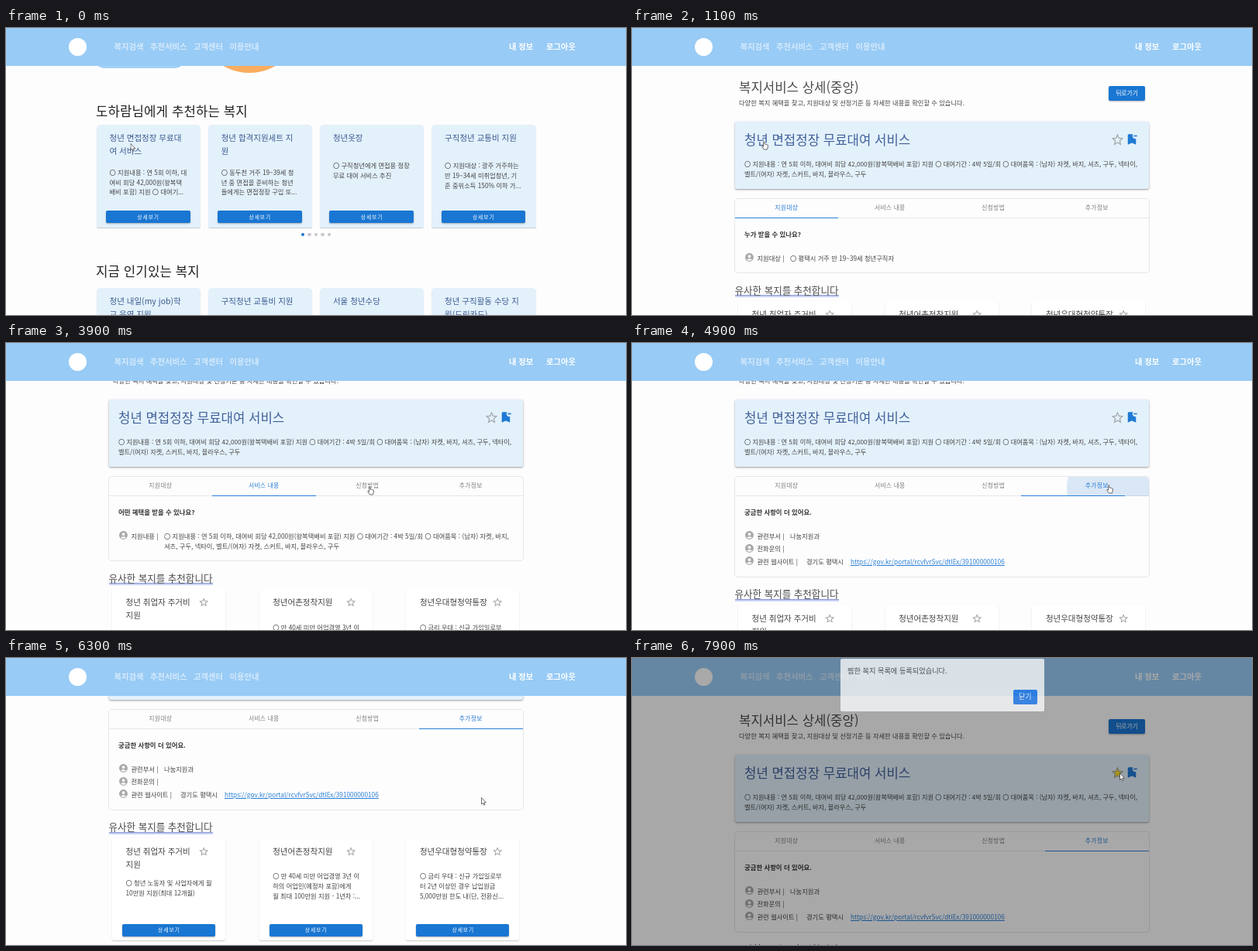
Write an HTML page that moves like this. It is 800x371 px and loops after 8000 ms.

```html
<!DOCTYPE html>
<html lang="ko">
<head>
<meta charset="utf-8">
<title>복지서비스 상세</title>
<style>
html, body { margin: 0; width: 100%; height: 100%; overflow: hidden; background: #fefdfe; }
body { position: relative; color: #444; font-weight: 350; font-family: "Noto Sans CJK KR", "Noto Sans KR", "Noto Sans CJK", "Noto Sans CJK JP", sans-serif; }
div, svg { position: absolute; box-sizing: border-box; }
.layer { left: 0; top: 0; width: 800px; height: 371px; }
.t { white-space: nowrap; }
.mid { transform: translateX(-50%); }
.nav { color: #d6eafc; font-weight: 700; }
.user { color: #fff; font-weight: 700; }
.h { color: #222; font-weight: 400; letter-spacing: .00735em; }
.title { color: #3a5a90; }
.dark { color: #444; }
.thin { color: #4c4c4e; font-weight: 300; letter-spacing: 0; }
.title.thin { color: #40609a; }
.q { color: #333; font-weight: 700; }
.btn { background: #1976d2; border-radius: 2px; box-shadow: 0 1px 2px rgba(0,0,0,.3); }
.btnText { color: #fff; font-weight: 500; }
.wide { letter-spacing: .13em; }
.blue { background: #e3f1fb; border-radius: 5px 5px 2px 2px; box-shadow: 0 1px 1px rgba(0,0,0,.2); }
.white { background: #fff; border-radius: 2px; box-shadow: 0 1px 1.5px rgba(0,0,0,.2); }
.tab { color: #808080; letter-spacing: .02857em; }
.tab.on { color: #2a7fd5; }
.link { color: #2a80d6; text-decoration: underline; }
</style>
</head>
<body>
<div id="home" class="layer"></div>
<div id="detail" class="layer"></div>
<div id="header" class="layer" style="height:49px;background:#98cbf5"></div>
<div id="shade" class="layer" style="background:#000"></div>
<div id="dialog" class="layer"></div>
<div id="cursor" style="left:0;top:0">
  <svg id="arrow" width="9" height="13" viewBox="0 0 9 13"><path d="M.5 .5V9L2.4 7.3 3.7 10.2 5 9.6 3.8 6.8H6.4Z" fill="#fff" stroke="#333" stroke-width=".7"/></svg>
  <svg id="hand" width="12" height="13" viewBox="0 0 12 13" style="left:-3px"><path d="M2.6 1.2Q3.3 .2 4 1.2V4.2Q4.9 3.6 5.5 4.5 6.4 4 7 4.9 8.2 4.5 8.4 5.8V8L7.4 11H3.4L.8 7.4Q.6 6.2 1.6 6.5L2.6 7.4Z" fill="#fff" stroke="#333" stroke-width=".7"/></svg>
</div>
<script>
const LOOP = 8000, STEP = 100;
const $ = id => document.getElementById(id);

// Text whose first line is centred on cy
const text = (x, cy, size, str, cls = '', lh = 16) =>
  `<div class="t ${cls}" style="left:${x}px;top:${cy - lh / 2 - .04 * size}px;font-size:${size}px;line-height:${lh}px">${str}</div>`;
const box = (x, y, w, h, cls = '', css = '', inner = '') =>
  `<div class="${cls}" style="left:${x}px;top:${y}px;width:${w}px;height:${h}px;${css}">${inner}</div>`;
const icon = (cx, cy, size, d, color, id = '') =>
  `<svg ${id && `id="${id}"`} style="left:${cx - size / 2}px;top:${cy - size / 2}px" width="${size}" height="${size}" viewBox="0 0 24 24"><path d="${d}" fill="${color}"/></svg>`;
const body = (x, cy, str, cls) => text(x, cy, 8.27, str, cls, 12.7);
const title = (x, cy, str, cls = 'title') => text(x, cy, 10.5, str, cls, 16.7);
const more = (x, y, w) => box(x, y, w, 16, 'btn') + text(x + w / 2 + .4, y + 8, 6.8, '상세보기', 'btnText wide mid');

const STAR = 'M22 9.24l-7.19-.62L12 2 9.19 8.63 2 9.24l5.46 4.73L5.82 21 12 17.27 18.18 21l-1.63-7.03L22 9.24z';
const STAR_HOLE = 'M12 15.4l-3.76 2.27 1-4.28-3.32-2.88 4.38-.38L12 6.1l1.71 4.04 4.38.38-3.32 2.88 1 4.28L12 15.4z';
const MARK = 'M21 7h-6V5h6zM19 21l-7-3-7 3V5c0-1.1.9-2 2-2h7c-.63.84-1 1.87-1 3 0 2.76 2.24 5 5 5 .34 0 .68-.03 1-.1z';
const PERSON = 'M12 2C6.48 2 2 6.48 2 12s4.48 10 10 10 10-4.48 10-10S17.52 2 12 2zm0 4c1.93 0 3.5 1.57 3.5 3.5S13.93 13 12 13s-3.5-1.57-3.5-3.5S10.07 6 12 6zm0 14c-2.03 0-4.43-.82-6.14-2.88C7.55 15.8 9.68 15 12 15s4.45.8 6.14 2.12C16.43 19.18 14.03 20 12 20z';

// Header
$('header').innerHTML = box(81, 13, 23, 23, '', 'background:#fff;border-radius:50%') +
  [[139.5, '복지검색'], [186, '추천서비스'], [242, '고객센터'], [288.5, '이용안내']]
    .map(([x, s]) => text(x, 24.5, 10.3, s, 'nav')).join('') +
  text(649, 24.5, 10.3, '내 정보', 'user') + text(697, 24.5, 10.3, '로그아웃', 'user');

// Home page
const picks = [
  ['청년 면접정장 무료대<br>여 서비스', '〇 지원내용 : 연 5회 이하, 대<br>여비 회당 42,000원(왕복택<br>배비 포함) 지원 〇 대여기...'],
  ['청년 합격지원세트 지<br>원', '〇 동두천 거주 19~39세 청<br>년 중 면접을 준비하는 청년<br>들에게는 면접정장 구입 또...'],
  ['청년옷장', '〇 구직청년에게 면접용 정장<br>무료 대여 서비스 추진'],
  ['구직청년 교통비 지원', '〇 지원대상 : 광주 거주하는<br>만 19~34세 미취업청년, 기<br>준 중위소득 150% 이하 가...']
];
const popular = ['청년 내일(my job)학<br>교 운영 지원', '구직청년 교통비 지원', '서울 청년수당', '청년 구직활동 수당 지<br>원(드림카드)'];
const homeX = i => 116.5 + 144.2 * i;
$('home').innerHTML =
  box(116, 20, 113, 32, '', 'background:#a3d1f7;border-radius:10px') +
  box(247, -76, 134, 134, '', 'background:#f9ad60;border-radius:50%') +
  text(116, 108, 16.74, '도하람님에게 추천하는 복지', 'h', 24) +
  text(116, 315, 16.74, '지금 인기있는 복지', 'h', 24) +
  picks.map(([name, info], i) => {
    const x = homeX(i);
    return box(x, 125, 134.5, 133, 'blue') + title(x + 17, 143, name) +
      body(x + 17, name.includes('<br>') ? 186.5 : 178, info) + more(x + 12.5, 236, 108.5);
  }).join('') +
  popular.map((name, i) => box(homeX(i), 336, 134.5, 133, 'blue') + title(homeX(i) + 17, 354, name)).join('') +
  [0, 1, 2, 3, 4].map(i => box(380.8 + 8.5 * i, 264.8, 4.4, 4.4, '', `border-radius:50%;background:${i ? '#c8c8cc' : '#1976d2'}`)).join('');

// Detail page
const TAB_X = 132.5, TAB_W = 133.5, FRAME_Y = 224;
const row = (cy, label, rest = '') => icon(151, cy - .8, 13, PERSON, '#a9a9ab') + body(161.5, cy, label + ' |') + rest;
const panels = [
  ['누가 받을 수 있나요?', 320.5, row(301.5, '지원대상', body(204, 301.5, '〇 평택시 거주 만 19~39세 청년구직자'))],
  ['어떤 혜택을 받을 수 있나요?', 333.5, row(301.5, '지원내용', body(204, 301.5,
    '〇 지원내용 : 연 5회 이하, 대여비 회당 42,000원(왕복택배비 포함) 지원 〇 대여기간 : 4박 5일/회 〇 대여품목 : (남자) 자켓, 바지,<br>셔츠, 구두, 넥타이, 벨트/(여자) 자켓, 스커트, 바지, 블라우스, 구두'))],
  ['어떻게 신청하나요?', 320.5, row(301.5, '신청방법')],
  ['궁금한 사항이 더 있어요.', 354, row(301.5, '관련부서', body(204, 301.5, '나눔지원과')) + row(318, '전화문의') +
    row(334.3, '관련 웹사이트', body(225, 334.3, '경기도 평택시') + body(282, 334.3, 'https://gov.kr/portal/rcvfvrSvc/dtlEx/391000000106', 'link'))]
];
const similar = [
  ['청년 취업자 주거비<br>지원', '〇 청년 노동자 및 사업자에게 월<br>10만원 지원(최대 12개월)'],
  ['청년어촌정착지원', '〇 만 40세 미만 어업경영 3년 이<br>하의 어업인(예정자 포함)에게<br>월 최대 100만원 지원 - 1년차 :...'],
  ['청년우대형청약통장', '〇 금리 우대 : 신규 가입일로부<br>터 2년 이상인 경우 납입원금<br>5,000만원 한도 내(단, 전환신...']
];
$('detail').innerHTML =
  text(138, 81, 16.74, '복지서비스 상세(중앙)', 'h thin', 24) +
  body(138, 101, '다양한 복지 혜택을 찾고, 지원대상 및 선정기준 등 자세한 내용을 확인할 수 있습니다.') +
  box(615, 79, 47, 18.7, 'btn') + text(638.6, 88.3, 7.85, '뒤로가기', 'btnText mid') +
  box(132.5, 125, 534.5, 86.5, '', 'background:#e3f1fb;border-radius:2px;box-shadow:0 1px 2.5px rgba(0,0,0,.4)') +
  text(145, 149, 16.74, '청년 면접정장 무료대여 서비스', 'title thin', 24) +
  icon(626, 148.5, 19, STAR, '#ffdc20', 'gold') + icon(626, 148.5, 19, STAR + STAR_HOLE, '#a6aaae') +
  icon(645.2, 148.2, 18, MARK, '#1f7ad4') +
  text(145, 180, 8.2, '〇 지원내용 : 연 5회 이하, 대여비 회당 42,000원(왕복택배비 포함) 지원 〇 대여기간 : 4박 5일/회 〇 대여품목 : (남자) 자켓, 바지, 셔츠, 구두, 넥타이,<br>벨트/(여자) 자켓, 스커트, 바지, 블라우스, 구두', '', 12.7) +
  `<div id="frame" style="left:132px;top:${FRAME_Y}px;width:535.5px;border:1px solid #e6e6ec;border-radius:5px"></div>` +
  box(132.5, 249, 534.5, 1, '', 'background:#e6e6ec') +
  box(TAB_X, 224.5, TAB_W * 4, 25, '', 'overflow:hidden;border-radius:5px 5px 0 0',
    [0, 1, 2, 3].map(i => box(TAB_W * i, 0, TAB_W, 25, '', 'overflow:hidden', '<div class="ripple" style="border-radius:50%;background:#1976d2"></div>')).join('')) +
  ['지원대상', '서비스 내용', '신청방법', '추가정보'].map((s, i) => text(TAB_X + TAB_W * (i + .5), 236.7, 7.85, s, 'tab mid')).join('') +
  `<div id="bar" style="top:248.5px;width:${TAB_W}px;height:1.5px;background:#2a80d6"></div>` +
  panels.map(([q, , rows]) => `<div class="panel" style="left:0;top:0">${text(145, 270, 8.4, q, 'q')}${rows}</div>`).join('') +
  '<div id="similar" style="left:0;top:0">' +
  box(132.5, 28.7, 134, 3.2, '', 'background:#c6d0f6;border-top:1px solid #8c9cd2') +
  text(132.5, 23, 12.55, '유사한 복지를 추천합니다', 'h thin', 18) +
  similar.map(([name, info], i) => {
    const x = 137 + 189.7 * i;
    return box(x, 37, 146, 132, 'white') + title(x + 17.5, 54.7, name, 'dark') +
      icon(x + 118, 53.7, 14.4, STAR + STAR_HOLE, '#a0a0a4') +
      body(x + 17.5, name.includes('<br>') ? 94.5 : 86, info) + more(x + 13, 147.7, 120);
  }).join('') + '</div>';

$('dialog').innerHTML =
  box(269, 1, 262.5, 67.5, '', 'background:#f7f8f9;border-radius:2px') +
  text(278, 16, 9.2, '찜한 복지 목록에 등록되었습니다.') +
  box(492, 41, 30.5, 18.5, '', 'background:#1f7cf0;border-radius:2px') + text(507.3, 50, 9, '닫기', 'btnText mid');

// Timeline
const OPEN = 800, LIKE = 7700;
const clicks = [[3150, 1], [4050, 2], [4750, 3]];
const scrolls = [[0, 4], [2430, 4], [2700, 52], [5300, 52], [5750, 158], [6450, 158], [7050, 0]];
const moves = [
  [0, 160.5, 149], [100, 160.5, 149], [500, 170, 146], [1300, 170, 146], [2100, 384.5, 198], [2700, 384.5, 198],
  [3000, 334, 182], [3400, 334, 182], [3800, 469, 185], [4150, 469, 185], [4500, 615, 183],
  [5200, 615, 183], [5400, 613, 180], [7000, 613, 180], [7450, 629, 148.5]
];
const hands = [[200, 1400], [2950, 5300]];

const clamp = v => Math.min(1, Math.max(0, v));
const smooth = v => (v = clamp(v), v * v * (3 - 2 * v));
// Eased value of column c in a table of timed rows
function at(rows, t, c = 1) {
  const i = rows.findIndex(r => r[0] > t);
  if (i < 0) return rows[rows.length - 1][c];
  const a = rows[i - 1], b = rows[i];
  return a[c] + (b[c] - a[c]) * smooth((t - a[0]) / (b[0] - a[0]));
}
const show = (el, on) => { el.style.display = on ? '' : 'none'; };

const tabs = document.querySelectorAll('.tab'), panelEls = document.querySelectorAll('.panel'), ripples = document.querySelectorAll('.ripple');

function render(t) {
  show($('home'), t < OPEN);
  show($('detail'), t >= OPEN);
  $('detail').style.top = -Math.round(at(scrolls, t)) + 'px';

  let active = 0, barPos = 0;
  for (const [time, tab] of clicks) {
    if (t >= time) active = tab;
    // the strip slows down late, so it arrives early
    barPos += Math.min(1, smooth((t - time) / 300) * 1.54);
    const age = t - time + 150, r = 84 * smooth(age / 500);
    const s = ripples[tab].style, x = at(moves, time, 1) - TAB_X - TAB_W * tab;
    show(ripples[tab], age > 0 && age < 850);
    s.left = x - r + 'px';
    s.top = 15 - r + 'px';
    s.width = s.height = 2 * r + 'px';
    s.opacity = .157 * (1 - clamp((age - 400) / 450));
  }
  tabs.forEach((el, i) => el.classList.toggle('on', i === active));
  panelEls.forEach((el, i) => show(el, i === active));
  $('bar').style.left = TAB_X + TAB_W * barPos + 'px';
  const bottom = panels[active][1];
  $('frame').style.height = bottom + .8 - FRAME_Y + 'px';
  $('similar').style.top = bottom + 'px';

  show($('gold'), t >= LIKE);
  const fade = clamp((t - LIKE) / 250);
  $('shade').style.opacity = .42 * fade;
  $('dialog').style.opacity = fade;

  const hand = hands.some(([a, b]) => t >= a && t < b);
  show($('hand'), hand);
  show($('arrow'), !hand);
  $('cursor').style.transform = `translate(${at(moves, t, 1)}px,${at(moves, t, 2)}px)`;
}

const start = performance.now();
function tick() {
  const t = (performance.now() - start) % LOOP;
  render(Math.floor(t / STEP) * STEP);
  requestAnimationFrame(tick);
}
render(0);
requestAnimationFrame(tick);
</script>
</body>
</html>
```
